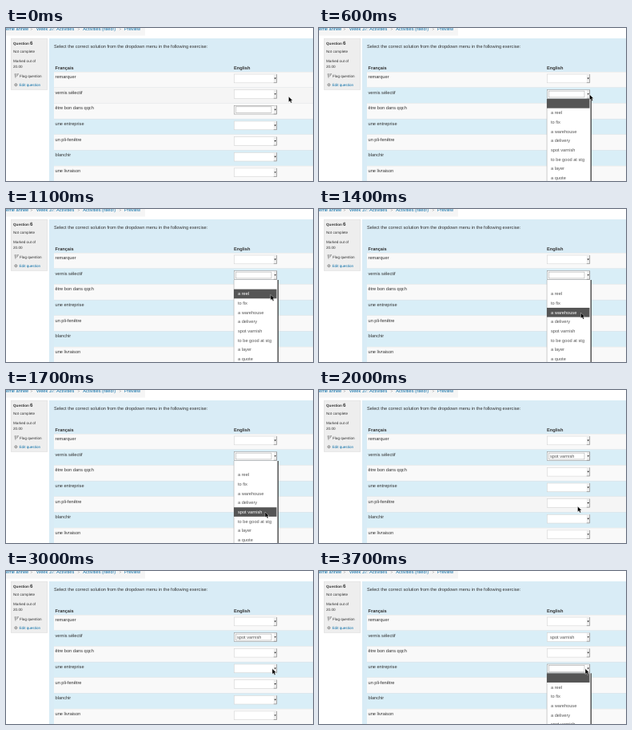
Write an HTML page that moves like this. It is 384 px wide and 192 px high and loops after 4000 ms.

```html
<!DOCTYPE html>
<html lang="en">
<head>
<meta charset="utf-8">
<title>Dropdown exercise</title>
<style>
  html, body { margin: 0; width: 100%; height: 100%; overflow: hidden; background: #fff; }
  svg { display: block; width: 100vw; height: 100vh; font-family: "Liberation Sans", Arial, sans-serif; text-rendering: geometricPrecision; }
</style>
</head>
<body>
<svg id="stage" viewBox="0 0 384 192"></svg>
<script>
const LOOP = 4000, STEP = 100;
const ROW_TOP = 55, ROW_H = 19.65, ITEM_H = 11.65;
const SIZE = 5.65, SMALL = 4.6;
const INK = '#333', LINK = '#0a6ea8', BLUE = '#d9ecf6';
const words = ['remarquer', 'vernis sélectif', 'être bon dans qqch', 'une entreprise',
  'un pli-fenêtre', 'blanchir', 'une livraison'];
const options = ['', 'a reel', 'to fix', 'a warehouse', 'a delivery', 'spot varnish',
  'to be good at stg', 'a layer', 'a quote'];
// time, x, y of the pointer tip
const path = [[0, 353.5, 86], [400, 338.5, 83.5], [600, 338.5, 83.5], [1100, 331, 107.5],
  [1700, 324, 153], [1900, 324, 153], [2000, 323.5, 146], [2500, 324, 113.3],
  [3000, 333, 122.5], [LOOP, 333, 122.5]];

const rect = (x, y, w, h, fill, stroke = 'none', sw = .6) =>
  `<rect x="${x}" y="${y}" width="${w}" height="${h}" fill="${fill}" stroke="${stroke}" stroke-width="${sw}"/>`;
const text = (x, y, size, str, fill = INK, weight = 400) =>
  `<text x="${x}" y="${y}" font-size="${size}" fill="${fill}" font-weight="${weight}">${str}</text>`;
const shape = (d, fill, stroke = 'none', sw = .6) =>
  `<path d="${d}" fill="${fill}" stroke="${stroke}" stroke-width="${sw}"/>`;

function pointer(t) {
  const i = path.findIndex(p => p[0] > t);
  const [t0, x0, y0] = path[i - 1], [t1, x1, y1] = path[i];
  const k = (t - t0) / (t1 - t0);
  return [x0 + (x1 - x0) * k, y0 + (y1 - y0) * k];
}

const page =
  rect(0, 0, 174, 9.5, '#f5f5f5') +
  text(0, 3.4, SIZE, 'ème année', LINK) +
  text(38, 3.4, SIZE, 'Week 37: Activities', LINK) +
  text(96.3, 3.4, SIZE, 'Activities (filled!)', LINK) +
  text(148, 3.4, SIZE, 'Preview', LINK) +
  [30.5, 89.5, 141.5].map(x => text(x, 3.4, 4.6, '&gt;', '#888')).join('') +
  rect(6.3, 13.3, 45.4, 64, '#eee', '#ddd') +
  text(9, 21.3, SMALL, 'Question', INK, 700) +
  text(30, 21.3, 6.2, '6', INK, 700) +
  text(9, 31.2, SMALL, 'Not complete') +
  text(9, 42.5, SMALL, 'Marked out of') +
  text(9, 49.7, SMALL, '20.00') +
  text(17, 61.6, SMALL, 'Flag question') +
  text(16.5, 72.8, SMALL, 'Edit question', LINK) +
  shape('M11 57.5l1 5.2M11 57.7q2 1 4.5-.2l-1.5 2.6h-2.4', 'none', '#666') +
  '<circle cx="12.4" cy="71.3" r="1.5" fill="#ccc" stroke="#888" stroke-width="1"/>' +
  rect(54, 13, 330, 179, BLUE) +
  text(60, 25.2, SIZE, 'Select the correct solution from the dropdown menu in the following exercise:') +
  text(61.5, 51.5, SIZE, 'Français', INK, 700) +
  text(285, 51.5, SIZE, 'English', INK, 700);

function select(y, value, focused) {
  const mid = y + 5.6;
  return rect(285.3, y + .3, 53.4, 10.8, '#fff', focused ? '#999' : '#d4d4d4') +
    rect(334.8, y + .7, 3.6, 10, '#eee') +
    shape(`M338.6 ${y + .4}v10.5h-3.8`, 'none', '#777') +
    shape(`M335.5 ${mid - .8}h2.4l-1.2 1.7z`, '#111') +
    (focused ? rect(287.5, y + 1.8, 44.5, 7.8, 'none', '#aaa') : '') +
    text(289, y + 7.4, SIZE, value, '#555');
}

function popup(top, y) {
  const active = Math.max(0, Math.floor((y - top) / ITEM_H));
  return rect(285, top, 55, 120, '#fff') +
    rect(284.8, top, .5, 120, '#999') +
    rect(339.5, top, 1.5, 120, '#555') +
    options.map((label, i) => {
      const on = i === active, iy = top + i * ITEM_H;
      return (on ? rect(285, iy, 53.5, ITEM_H, '#555') : '') +
        text(290, iy + 7.7, SIZE, label, on ? '#fff' : '#555');
    }).join('');
}

function draw(t) {
  const [x, y] = pointer(t);
  const open = t >= 600 && t < 1900 ? 1 : t >= 3100 ? 3 : -1;
  const focus = t < 600 ? 2 : t < 3100 ? 1 : 3;
  const hover = open < 0 && t !== 3000 ? Math.floor((y - ROW_TOP) / ROW_H) : -1;
  const rows = words.map((word, i) => {
    const top = ROW_TOP + i * ROW_H;
    const fill = i === hover ? '#f5f5f5' : i % 2 ? '#d9eef7' : '#f9f9f9';
    return rect(60, top, 324, ROW_H, fill) + rect(60, top, 324, .4, '#ddd') +
      text(61.5, top + 8, SIZE, word) +
      select(top + 2.7, i === 1 && t >= 1900 ? options[5] : '', i === focus);
  }).join('');
  const list = open < 0 ? '' : popup(ROW_TOP + open * ROW_H + 14.35, y);
  const arrow = shape(`M${x} ${y}v7l1.6-1.4 1.2 2.4 1.3-.6-1.1-2.4h2z`, '#000', '#fff', .4);
  stage.innerHTML = page + rows + list + arrow;
}

const stage = document.getElementById('stage');
const start = performance.now();
let shown = -1;
function tick() {
  const t = Math.floor((performance.now() - start) % LOOP / STEP) * STEP;
  if (t !== shown) draw(shown = t);
  requestAnimationFrame(tick);
}
tick();
</script>
</body>
</html>
```
